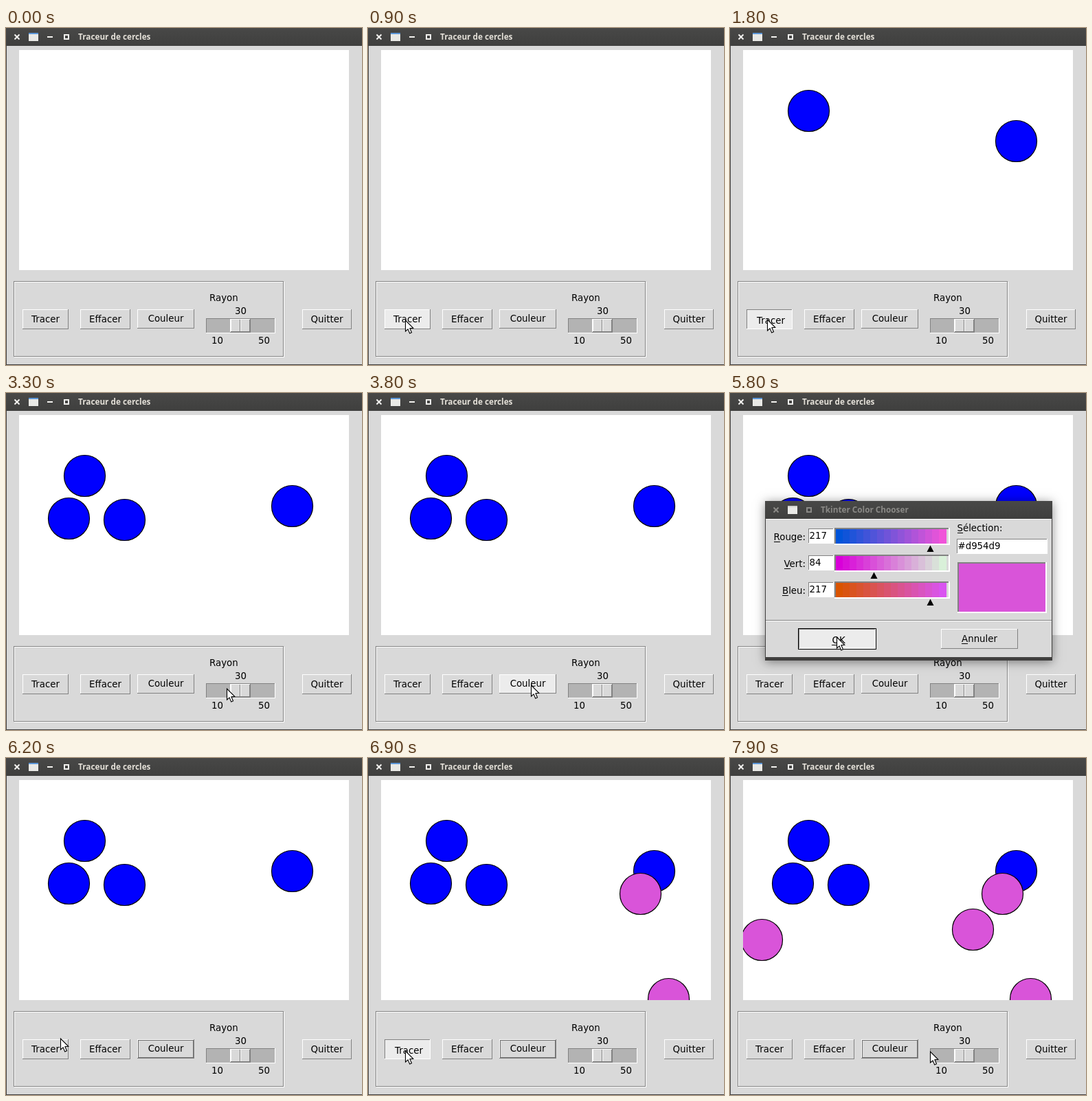
An HTML page with a canvas that plays this animation: 518 px wide and 490 px high, repeating every 8 s.

```html
<!DOCTYPE html>
<html lang="fr">
<head>
<meta charset="utf-8">
<title>Traceur de cercles</title>
<style>
html, body { margin: 0; height: 100%; overflow: hidden; background: #d9d9d9; }
canvas { display: block; }
</style>
</head>
<body>
<canvas id="stage" width="518" height="490"></canvas>
<script>
const ctx = document.getElementById('stage').getContext('2d');
const LOOP = 8000, STEP = 100;
const FACE = '#d9d9d9', HOVER = '#ececec', DARK = '#828282', BAR = '#403f3e';
const FONT = '13.33px "DejaVu Sans", sans-serif';
const TITLE_FONT = 'bold 11.75px "Open Sans", sans-serif';
const BLUE = '#0000ff', PINK = '#d954d9';

// time, centre x, centre y, colour
const circles = [
  [1100, 114.5, 120.5, BLUE], [1500, 416.5, 164.5, BLUE],
  [1900, 172.5, 184.5, BLUE], [2300, 91.5, 182.5, BLUE],
  [6500, 396.5, 197.5, PINK], [6800, 437.5, 350.5, PINK],
  [7100, 353.5, 249.5, PINK], [7300, 46.5, 264.5, PINK]
];
// pointer keys: time, x, y
const path = [
  [300, 285, 436], [900, 54, 425], [1200, 54, 425], [1300, 54, 424], [2400, 54, 424],
  [3100, 341, 438], [3300, 321, 430], [3500, 237, 425], [3800, 237, 425],
  [4500, 222, 284], [4700, 205, 250], [5000, 205, 250], [5600, 155, 355],
  [5900, 155, 355], [6300, 54, 426], [7400, 54, 426], [7900, 291, 427]
];
const presses = {
  Tracer: [[1000, 1100], [1400, 1500], [1800, 1900], [2100, 2300], [6400, 6500], [6700, 6800], [6900, 7100]],
  Couleur: [[3700, 3800]],
  OK: [[5700, 5900]]
};
const OPEN = 3900, PICK = 4800, APPLY = 4900, FOCUS_BACK = 5800, CLOSE = 5900;

let now, mouse;

function pointerAt(t) {
  if (t < path[0][0]) return { x: -99, y: -99 };
  const i = path.findIndex(k => k[0] > t);
  if (i < 0) return { x: path.at(-1)[1], y: path.at(-1)[2] };
  const [a, b] = [path[i - 1], path[i]];
  const p = (t - a[0]) / (b[0] - a[0]);
  return { x: Math.round(a[1] + (b[1] - a[1]) * p), y: Math.round(a[2] + (b[2] - a[2]) * p) };
}

const over = (x, y, w, h) => mouse.x >= x && mouse.x < x + w && mouse.y >= y && mouse.y < y + h;

function rect(x, y, w, h, color) {
  ctx.fillStyle = color;
  ctx.fillRect(x, y, w, h);
}

function text(s, x, y, align = 'left', color = '#000', font = FONT) {
  ctx.font = font;
  ctx.textAlign = align;
  ctx.fillStyle = color;
  ctx.fillText(s, x, y);
}

// text whose first letter is underlined
function hotText(s, x, y) {
  text(s, x, y);
  rect(Math.round(x), y + 2, Math.round(ctx.measureText(s[0]).width), 1, '#000');
}

function bevel(x, y, w, h, fill, sunken, bd = 1) {
  rect(x, y, w, h, sunken ? '#fff' : DARK);
  rect(x, y, w - bd, h - bd, sunken ? DARK : '#fff');
  rect(x + bd, y + bd, w - 2 * bd, h - 2 * bd, fill);
}

function button(label, x, y, w, h, base, enabled, hot) {
  const down = (presses[label] || []).some(([a, b]) => now >= a && now < b);
  const lit = down || (enabled && over(x, y, w, h));
  bevel(x, y, w, h, lit ? HOVER : FACE, down);
  const shift = down ? 2 : 0;
  ctx.font = FONT;
  const left = x + w / 2 - ctx.measureText(label).width / 2 + shift;
  (hot ? hotText : text)(label, left, base + shift);
}

function titleBar(x, y, w, label, active, canMinimise) {
  const g = ctx.createLinearGradient(0, y, 0, y + 26);
  g.addColorStop(0, '#484847');
  g.addColorStop(1, '#3f3f3e');
  rect(x, y, w, 26, g);
  const ink = active ? '#f2f1ee' : '#8a8986';
  ctx.strokeStyle = ink;
  ctx.lineWidth = 2;
  ctx.beginPath();
  ctx.moveTo(x + 12.5, y + 9.5); ctx.lineTo(x + 19.5, y + 16.5);
  ctx.moveTo(x + 19.5, y + 9.5); ctx.lineTo(x + 12.5, y + 16.5);
  ctx.stroke();
  rect(x + 33, y + 7, 14, 12, '#e9e9e6');
  rect(x + 33, y + 7, 14, 2, canMinimise ? '#5b96d8' : '#d2d2ce');
  let at = x + 60;
  if (canMinimise) {
    rect(at, y + 12, 8, 2, ink);
    at += 24;
  }
  ctx.strokeRect(at + 1, y + 10, 6, 6);
  text(label, at + 21, y + 17, 'left', active ? '#e4e0d8' : '#8a8986', TITLE_FONT);
}

function mainWindow(free) {
  rect(0, 0, 518, 490, FACE);
  rect(0, 26, 1, 464, BAR);
  rect(0, 489, 518, 1, BAR);
  titleBar(0, 0, 518, 'Traceur de cercles', now < OPEN || now >= FOCUS_BACK, true);

  rect(19, 32, 480, 320, '#fff');
  ctx.save();
  ctx.beginPath();
  ctx.rect(19, 32, 480, 320);
  ctx.clip();
  ctx.strokeStyle = '#000';
  ctx.lineWidth = 1.2;
  for (const [start, x, y, color] of circles) {
    if (now < start) continue;
    ctx.beginPath();
    ctx.arc(x, y, 30, 0, 7);
    ctx.fillStyle = color;
    ctx.fill();
    ctx.stroke();
  }
  ctx.restore();

  ctx.lineWidth = 1;
  ctx.strokeStyle = '#fff';
  ctx.strokeRect(12.5, 369.5, 392, 109);
  ctx.strokeStyle = DARK;
  ctx.strokeRect(11.5, 368.5, 392, 109);

  button('Tracer', 24, 409, 67, 29, 428, free);
  button('Effacer', 108, 409, 73, 29, 428, free);
  button('Couleur', 191, 409, 83, 28, 427, free);
  button('Quitter', 431, 409, 72, 29, 428, free);
  if (now >= CLOSE) {
    ctx.strokeStyle = '#000';
    ctx.setLineDash([1, 1]);
    ctx.strokeRect(192.5, 410.5, 80, 25);
    ctx.setLineDash([]);
  }

  text('Rayon', 296, 397);
  text('30', 341.5, 416, 'center');
  text('10', 307.5, 459, 'center');
  text('50', 375.5, 459, 'center');
  bevel(291, 422, 101, 22, '#b3b3b3', true);
  bevel(326, 423, 30, 20, free && over(326, 423, 30, 20) ? HOVER : FACE, false);
  rect(354, 424, 1, 18, DARK);
  rect(327, 441, 28, 1, DARK);
  rect(327, 424, 1, 17, '#fff');
  rect(340, 424, 1, 17, DARK);
  rect(341, 424, 1, 17, '#fff');
}

function colorRow(i, label, rgb) {
  const y = 196 + i * 39;
  ctx.font = FONT;
  hotText(label, 110 - ctx.measureText(label).width, y + 18);
  bevel(114, y + 1, 37, 22, '#fff', true);
  text(rgb[i], 115.5, y + 16);

  bevel(152, y, 168, 25, FACE, true, 2);
  for (let k = 0; k < 16; k++) {
    const c = rgb.slice();
    c[i] = k * 16;
    rect(154 + k * 10, y + 2, 11, 21, `rgb(${c})`);
  }
  const x = i === 1 && now >= PICK ? 209 : 291;
  ctx.fillStyle = over(152, y, 168, 25) ? '#f00' : '#000';
  ctx.beginPath();
  ctx.moveTo(x + .5, y + 25.5);
  ctx.lineTo(x + 5.5, y + 35);
  ctx.lineTo(x - 4.5, y + 35);
  ctx.fill();
}

function dialog() {
  ctx.save();
  ctx.shadowColor = 'rgba(0,0,0,.45)';
  ctx.shadowBlur = 14;
  ctx.shadowOffsetY = 2;
  rect(51, 157, 418, 232, BAR);
  ctx.restore();
  rect(52, 183, 416, 201, FACE);
  titleBar(51, 157, 418, 'Tkinter Color Chooser', now < FOCUS_BACK, false);
  rect(52, 183, 416, 1, '#fff');
  rect(52, 330, 416, 1, DARK);
  rect(52, 331, 416, 1, '#fff');

  const rgb = [217, now < APPLY ? 217 : 84, 217];
  const hex = '#' + rgb.map(v => v.toString(16)).join('');
  ['Rouge:', 'Vert:', 'Bleu:'].forEach((label, i) => colorRow(i, label, rgb));

  hotText('Sélection:', 330.5, 201);
  bevel(330, 212, 132, 22, '#fff', true);
  text(hex, 331.5, 227);
  bevel(331, 246, 130, 74, hex, true, 2);

  rect(99, 342, 114, 31, '#000');
  button('OK', 100, 343, 112, 29, 362, true, true);
  button('Annuler', 307, 343, 112, 29, 362, true, true);
}

function pointer() {
  ctx.save();
  ctx.translate(mouse.x + .5, mouse.y);
  ctx.beginPath();
  [[0, 0], [0, 16], [3.6, 12.8], [6.2, 19], [9, 17.8], [6.4, 11.8], [11.3, 11.4]]
    .forEach(p => ctx.lineTo(...p));
  ctx.closePath();
  ctx.fillStyle = '#fff';
  ctx.strokeStyle = '#000';
  ctx.lineWidth = 1.1;
  ctx.fill();
  ctx.stroke();
  ctx.restore();
}

function draw(ms) {
  now = Math.floor(ms % LOOP / STEP) * STEP;
  mouse = pointerAt(now);
  const open = now >= OPEN && now < CLOSE;
  mainWindow(!open);
  if (open) dialog();
  pointer();
}

let start;
function frame(ms) {
  start ??= ms;
  draw(ms - start);
  requestAnimationFrame(frame);
}
requestAnimationFrame(frame);
</script>
</body>
</html>
```
